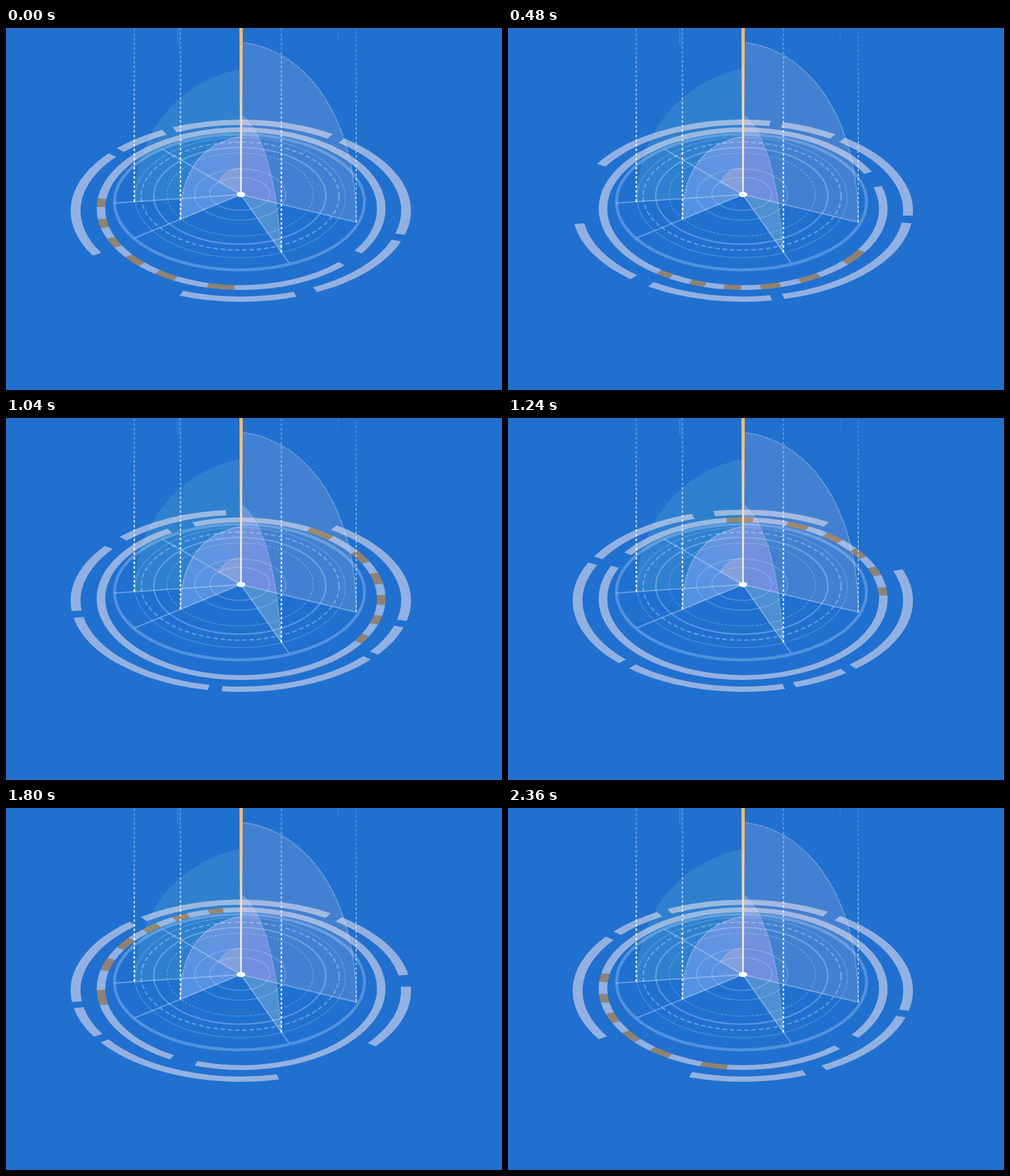
Write an HTML page that moves like this. It is 752x550 px and loops after 2.4 s.

```html
<!DOCTYPE html>
<html lang="en">
<head>
<meta charset="utf-8">
<title>Radar disc</title>
<style>
html, body { margin: 0; width: 100%; height: 100%; overflow: hidden; background: #2070d0; }
svg { display: block; width: 752px; height: 550px; }
</style>
</head>
<body>
<svg viewBox="0 0 752 550" fill="none">
  <defs>
    <linearGradient id="beam" x1="0" y1="0" x2="0" y2="1">
      <stop offset="0" stop-color="#fbb666"/>
      <stop offset=".45" stop-color="#fbd3a0"/>
      <stop offset=".8" stop-color="#f8ecd9"/>
      <stop offset="1" stop-color="#fff"/>
    </linearGradient>
    <linearGradient id="fade" gradientUnits="userSpaceOnUse" x1="0" y1="0" x2="0" y2="270">
      <stop offset="0" stop-color="#fff" stop-opacity=".22"/>
      <stop offset=".35" stop-color="#fff" stop-opacity=".45"/>
      <stop offset=".8" stop-color="#fff"/>
    </linearGradient>
    <linearGradient id="violet" gradientUnits="userSpaceOnUse" x1="350" y1="180" x2="275" y2="285">
      <stop offset="0" stop-color="#6a94df"/>
      <stop offset="1" stop-color="#5092e2"/>
    </linearGradient>
    <linearGradient id="plum" gradientUnits="userSpaceOnUse" x1="0" y1="132" x2="0" y2="260">
      <stop offset="0" stop-color="#6a98d8"/>
      <stop offset=".5" stop-color="#7291de"/>
      <stop offset="1" stop-color="#718ee0"/>
    </linearGradient>
    <clipPath id="wide"><path d="M356 253V22C455 32 531 135 531 295Z"/></clipPath>
  </defs>

  <!-- upright fans -->
  <path d="M356 253V62C275 78 197 145 194 264Z" fill="#2f80cf"/>
  <path d="M356 253V22C455 32 531 135 531 295Z" fill="#4281d1"/>
  <path d="M356 253V132C393 158 412 245 417 341Z" fill="#4e90d2"/>
  <path d="M356 253V132C393 158 412 245 417 341Z" fill="url(#plum)" clip-path="url(#wide)"/>
  <path d="M356 253V165C306 173 264.500 208 264.500 291Z" fill="url(#violet)"/>
  <path d="M356 253V213C340 213 328 222 322 234Z" fill="#84a0dc"/>
  <g stroke="#fff" stroke-width="1.6" stroke-dasharray="1.8 1.8">
    <path d="M357 22C455 32 531 135 531 295" opacity=".5"/>
    <path d="M357 132C393 158 412 245 417 341" opacity=".4"/>
    <path d="M356 165C306 173 264.500 208 264.500 291" opacity=".6"/>
    <path d="M356 213C340 213 328 222 322 234" opacity=".3"/>
  </g>

  <g id="disc" stroke="#d8ecff"></g>
  <g id="spokes" stroke="#d8ecff" stroke-opacity=".36" stroke-width="2"></g>
  <g id="outer" stroke="#f2e8ef" stroke-opacity=".55" stroke-width="15"></g>
  <g id="inner" stroke-width="13"></g>
  <g id="posts" stroke="url(#fade)" stroke-dasharray="4 3"></g>

  <path d="M260 0V25M263 0V28" stroke="#2c9ad8" stroke-width="1.500" opacity=".7"/>
  <path d="M503.500 0V18" stroke="#4a92da" opacity=".5"/>
  <path d="M353.900 0H359L357.300 252H355.300Z" fill="url(#beam)"/>
  <ellipse cx="356.300" cy="253" rx="6.500" ry="4" fill="#fff"/>
</svg>
<script>
const LOOP = 2400, STEP = 40;
const get = id => document.getElementById(id);

function add(parent, tag, attrs) {
  const el = document.createElementNS('http://www.w3.org/2000/svg', tag);
  for (const k in attrs) el.setAttribute(k, attrs[k]);
  parent.appendChild(el);
}

// circular arc between two angles in degrees
function arc(r, from, to) {
  const at = a => {
    const q = a * Math.PI / 180;
    return (r * Math.cos(q)).toFixed(2) + ' ' + (r * Math.sin(q)).toFixed(2);
  };
  return `M${at(from)}A${r} ${r} 0 ${to - from > 180 ? 1 : 0} 1 ${at(to)}`;
}

const outer = get('outer'), inner = get('inner');

// cx, cy, rx, ry, width, opacity, dash
[
  [354, 264.5, 189.5, 103, 4.5, .27, ''],
  [355, 257.5, 159.5, 91.5, 1.5, .2, ''],
  [355, 255.5, 150, 82, 2.2, .34, '7 4'],
  [354.5, 255, 130.5, 73.5, 2.2, .3, ''],
  [355, 253, 111, 63, 1.3, .28, '4 2'],
  [355, 253, 69, 39, 1.6, .24, ''],
  [354.5, 252, 45.5, 25, 1.6, .24, '']
].forEach(([cx, cy, rx, ry, w, o, d]) => add(get('disc'), 'ellipse',
  { cx, cy, rx, ry, 'stroke-width': w, 'stroke-opacity': o, 'stroke-dasharray': d || 'none' }));

[[164, 266], [195, 319], [237, 184], [429, 357], [531, 295]].forEach(([x, y]) =>
  add(get('spokes'), 'path', { d: `M356 253L${x} ${y}` }));

[[194.5, 264, 2, 1], [264.5, 291, 2, 1], [417.5, 341, 2, 1], [531, 295, 1.5, .7]].forEach(([x, y, w, o]) =>
  add(get('posts'), 'path', { d: `M${x} ${y}L${x + .01} 0`, 'stroke-width': w, opacity: o }));

[[150.5, 219], [223.2, 242.5], [246.4, 302.7], [307.5, 375.4], [379.7, 423.3], [430.8, 471.1]].forEach(([a, b]) =>
  add(outer, 'path', { d: arc(250.5, a, b) }));

// pale stretches alternate with amber blocks, with one opening
const marks = [44.2, 92.8, 103.7, 117.9, 126.7, 135.2, 143.3, 151.3, 158.3, 166.2, 172.5, 181.3, 187.3, 393.4];
for (let i = 1; i < marks.length; i++) {
  const amber = i % 2 === 0;
  add(inner, 'path', {
    d: arc(212.5, marks[i - 1], marks[i]),
    stroke: amber ? '#de8e30' : '#f2e8ef',
    'stroke-opacity': amber ? .6 : .55
  });
}

// soft start and finish of one full turn; the outer ring brakes a little later
const ease = (t, bend) => t + t * (1 - t) * bend;
const outerEase = t => ease(t, -.395 + t * (1.16 + t * (-1.118 + t * .945)));
const innerEase = t => ease(t, -.352 + t * .758);

function draw(ms) {
  const t = Math.floor(ms % LOOP / STEP) * STEP / LOOP;
  outer.setAttribute('transform', `translate(356 277.600) scale(1 .5365) rotate(${360 * outerEase(t)})`);
  inner.setAttribute('transform', `translate(356.500 274.500) scale(1 .564) rotate(${-360 * innerEase(t)})`);
}

const start = performance.now();
function tick() {
  draw(performance.now() - start);
  requestAnimationFrame(tick);
}
draw(0);
requestAnimationFrame(tick);
</script>
</body>
</html>
```
